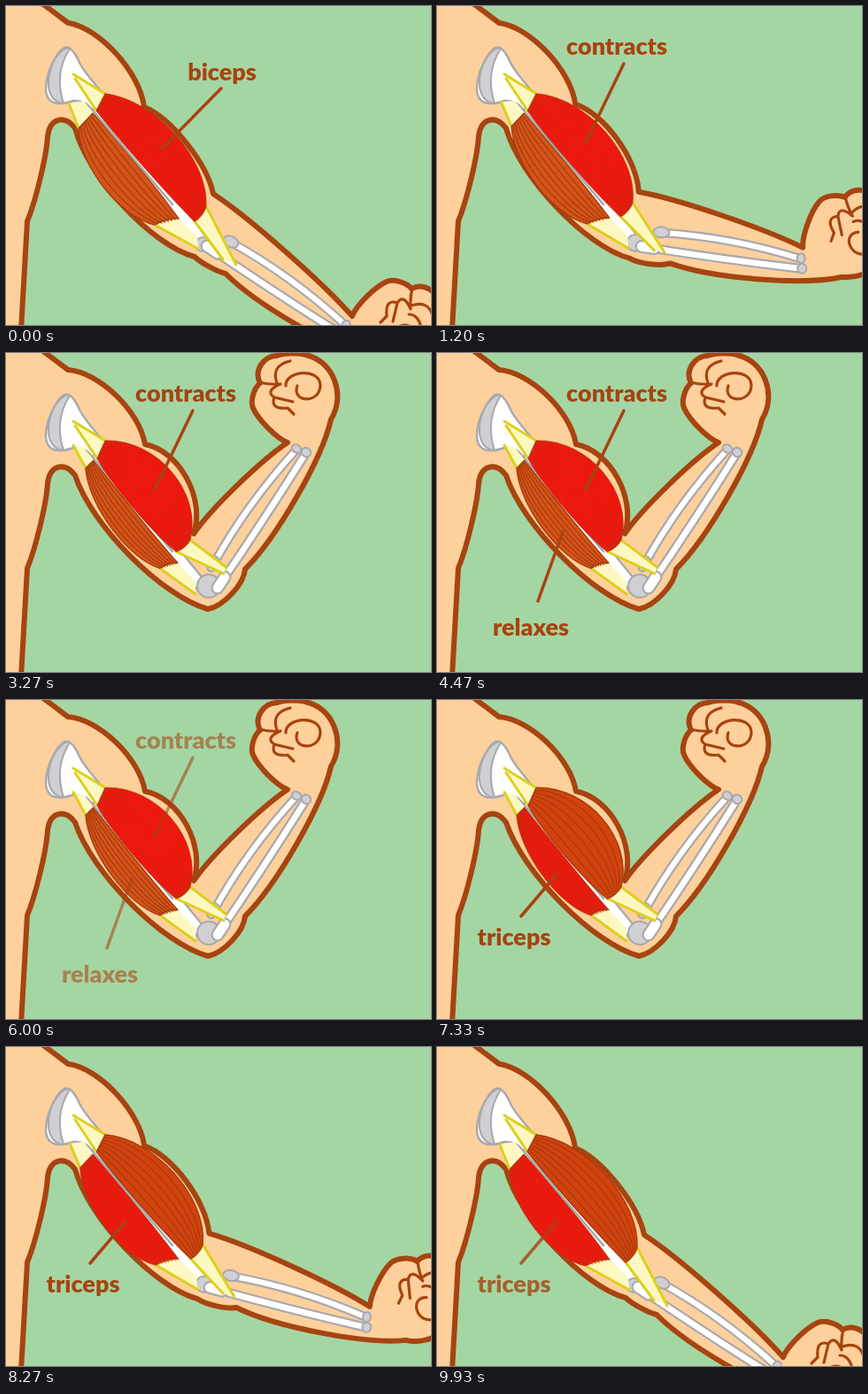
An HTML page with a canvas that plays this animation: 480x360 px, repeating every 9990 ms.

```html
<!DOCTYPE html>
<html lang="en">
<head>
<meta charset="utf-8">
<title>Biceps and triceps</title>
<style>
html, body { margin: 0; width: 100%; height: 100%; overflow: hidden; background: #a4d6a4; }
canvas { display: block; }
</style>
</head>
<body>
<canvas id="stage" width="480" height="360"></canvas>
<script>
const ctx = document.getElementById('stage').getContext('2d');
const LOOP = 9990, FADE = 300, SWAP = 6250, MOVE = 1500, FLEX = 910, EXTEND = 7540;
const GREEN = '#a4d6a4', SKIN = '#fdd09c', BROWN = '#a74410', FIBRE = '#a53c0a', RED = '#f3150f';
const GREY = '#a8a8ad', LIGHT = '#d0d0d4', PALE = '#fdf8c2', YELLOW = '#dcd01c';
const ELBOW = [230, 262];

// Each value is a [bent, straight] pair. Points are inner edge, then outer edge.
const biceps = {
  color: '#d2420f', tendonEdges: [0, 2],
  origin: [[78, 82, 76, 77], [78, 82, 76, 77]],
  top: [[103, 119, 112, 99], [102, 118, 112, 99]],
  bottom: [[192, 224, 208, 211], [213, 243, 226, 226]],
  insertion: [[246, 249, 249, 242], [245, 286, 260, 292]],
  bulge: [[-5, 34], [-2, 28]]
};
const triceps = {
  color: '#d4541a', tendonEdges: [2],
  origin: [[88, 107, 76, 104], [88, 107, 71, 110]],
  top: [[99, 121, 90, 130], [98, 121, 82, 138]],
  bottom: [[194, 237, 174, 243], [195, 240, 168, 247]],
  insertion: [[214, 258, 214, 272], [216, 260, 217, 274]],
  bulge: [[-1, -17], [2, -19]]
};

// text, centre, baseline, pointer line, fade-in start, fade-out start
const labels = [
  ['biceps', 244, 84, [243, 93, 176, 161], -FADE, 130],
  ['contracts', 203, 55, [211, 65, 168, 154], 480, 5870],
  ['relaxes', 106, 319, [114, 280, 142, 202], 3500, 5870],
  ['triceps', 87, 277, [95, 244, 135, 197], SWAP, 9870]
];

const clamp = v => Math.min(1, Math.max(0, v));
const mix = (a, b, k) => a.map((v, i) => v + (b[i] - v) * k);

// cubic-bezier(.25, .1, .25, 1)
function ease(x) {
  let lo = 0, hi = 1, u;
  for (let i = 0; i < 20; i++) {
    u = (lo + hi) / 2;
    if (0.75 * u * (1 - u) + u ** 3 < x) lo = u; else hi = u;
  }
  return 0.3 * u * (1 - u) ** 2 + 3 * u * u * (1 - u) + u ** 3;
}

function paint(path, fill, stroke, width) {
  if (fill) { ctx.fillStyle = fill; ctx.fill(path); }
  if (stroke) { ctx.strokeStyle = stroke; ctx.lineWidth = width; ctx.stroke(path); }
}
function line(x1, y1, x2, y2, color, width) {
  paint(new Path2D(`M${x1},${y1}L${x2},${y2}`), null, color, width);
}
function oval(x, y, rx, ry = rx, turn = 0) {
  const path = new Path2D();
  path.ellipse(x, y, rx, ry, turn, 0, 7);
  paint(path, LIGHT, GREY, 2);
}

// Curve that swells by `bulge` pixels to the left of its direction
function swell(path, x1, y1, x2, y2, bulge) {
  const dx = x2 - x1, dy = y2 - y1, h = bulge * 4 / 3 / Math.hypot(dx, dy);
  const control = s => [x1 + dx * s + dy * h, y1 + dy * s - dx * h];
  path.lineTo(x1, y1);
  path.bezierCurveTo(...control(0.22), ...control(0.75), x2, y2);
}

function rotate([px, py, bulge], angle) {
  const c = Math.cos(angle), s = Math.sin(angle), x = px - ELBOW[0], y = py - ELBOW[1];
  return [ELBOW[0] + x * c - y * s, ELBOW[1] + x * s + y * c, bulge];
}

function inForearm(angle, draw) {
  ctx.save();
  ctx.translate(...ELBOW);
  ctx.rotate(angle);
  ctx.translate(-ELBOW[0], -ELBOW[1]);
  draw();
  ctx.restore();
}

// Joints are x, y and the swelling of the edge that leads there.
function drawSkin(k, angle) {
  const hand = [[318, 101, 5], [279, 62, 4], [287, 34, 4], [306, 3, 10], [338, 2, 2],
    [367, 75, 20], [270, 244, 10]].map(joint => rotate(joint, angle));
  const joints = [[38, -5, 0], [70, 19, 0],
    mix([157, 103, 17], [156, 114, 17], k), mix([212, 204, 23], [234, 212, 12], k),
    ...hand, mix([228, 289, 8], [213, 283, 2], k),
    [78, 138, 20], [47, 147, -14], [24, 243, 3], [17, 366, 0], [-12, 366, 0], [-12, -12, 0]];
  const path = new Path2D();
  joints.slice(1).forEach(([x, y, bulge], i) => swell(path, joints[i][0], joints[i][1], x, y, bulge));
  path.closePath();
  paint(path, SKIN, BROWN, 6);
}

function drawFist() {
  paint(new Path2D('M286,33Q298,36 310,35Q292,43 303,50Q298,64 318,62L325,69M303,50L324,55' +
    'M306,34Q299,14 321,9M316,37C315,20 354,16 355,36C355,58 322,56 329,37'), null, BROWN, 3.2);
}

function bone(path, width) {
  paint(path, null, GREY, width);
  paint(path, null, '#fff', width - 4.4);
}

function drawUpperBone(k) {
  bone(new Path2D('M94,108L222,264'), 15);
  paint(new Path2D('M66,47Q75,45 83,64Q88,74 108,97L98,118Q90,106 76,107C22,126 52,53 66,47Z'),
    '#fff', GREY, 2.4);
  paint(new Path2D('M70,47C48,53 36,107 65,110Q54,76 72,48Z'), LIGHT, GREY, 2);
  const [x, y, r] = mix([229, 263, 13], [222, 269, 8], k);
  oval(x, y, r);
}

function drawForearmBones() {
  bone(new Path2D('M234,239Q272,170 328,109'), 10.5);
  oval(234, 238, 6, 9, 0.5);
  bone(new Path2D('M239,265Q291,189 338,114'), 11);
  bone(new Path2D('M239,265L247,253'), 15);
  oval(328, 108, 5.5, 4.5, 0.5);
  oval(339, 112, 5.5, 5, 0.5);
}

function drawTendon(bonePoints, musclePoints, edges) {
  const [ax, ay, bx, by] = bonePoints, [cx, cy, dx, dy] = musclePoints;
  paint(new Path2D(`M${ax},${ay}L${bx},${by}L${dx},${dy}L${cx},${cy}Z`), PALE);
  for (const i of edges) {
    line(bonePoints[i], bonePoints[i + 1], musclePoints[i], musclePoints[i + 1], YELLOW, 3);
  }
}

function drawMuscle(muscle, k, active) {
  const [origin, top, bottom, insertion, bulge] =
    ['origin', 'top', 'bottom', 'insertion', 'bulge'].map(key => mix(...muscle[key], k));
  drawTendon(origin, top, muscle.tendonEdges);
  drawTendon(insertion, bottom, muscle.tendonEdges);

  // A fibre at s runs between the inner (0) and outer (1) edge.
  const fibre = (path, s) => {
    const ends = [top, bottom].flatMap(p => mix(p.slice(0, 2), p.slice(2), s));
    swell(path, ...ends, bulge[0] + (bulge[1] - bulge[0]) * s);
    return path;
  };
  const body = fibre(new Path2D(), 0);
  const [ax, ay, bx, by] = bottom, [tx, ty] = top.slice(2);
  swell(body, ax, ay, bx, by, -2);
  swell(body, bx, by, tx, ty, -bulge[1]);
  body.closePath();
  paint(body, muscle.color);
  ctx.globalAlpha = active;
  paint(body, RED);
  ctx.globalAlpha = 1 - active * 0.35;
  paint(body, null, FIBRE, 1.4);
  for (let i = 1; i < 7; i++) {
    const path = new Path2D();
    path.moveTo(...mix(top.slice(0, 2), top.slice(2), i / 7));
    paint(fibre(path, i / 7), null, FIBRE, 1.2);
  }
  ctx.globalAlpha = 1;
}

function drawLabel([text, x, y, pointer, start, end], t) {
  ctx.globalAlpha = clamp((t - start) / FADE) * clamp(1 - (t - end) / FADE);
  line(...pointer, BROWN, 3.5);
  ctx.fillStyle = BROWN;
  ctx.fillText(text, x, y);
  ctx.globalAlpha = 1;
}

function render(t) {
  const k = 1 - ease(clamp((t - FLEX) / MOVE)) + ease(clamp((t - EXTEND) / MOVE));
  const angle = k * Math.PI / 2;
  const swap = clamp((t - SWAP) / FADE);
  ctx.fillStyle = GREEN;
  ctx.fillRect(0, 0, 480, 360);
  drawSkin(k, angle);
  inForearm(angle, drawFist);
  drawUpperBone(k);
  inForearm(angle, drawForearmBones);
  drawMuscle(triceps, k, swap);
  line(99, 119, 188, 224, GREY, 2.5);
  drawMuscle(biceps, k, 1 - swap);
  labels.forEach(label => drawLabel(label, t));
}

ctx.lineCap = ctx.lineJoin = 'round';
ctx.font = '900 27px Lato, sans-serif';
ctx.textAlign = 'center';

const begin = performance.now();
function tick() {
  render((performance.now() - begin) % LOOP);
  requestAnimationFrame(tick);
}
tick();
</script>
</body>
</html>
```
